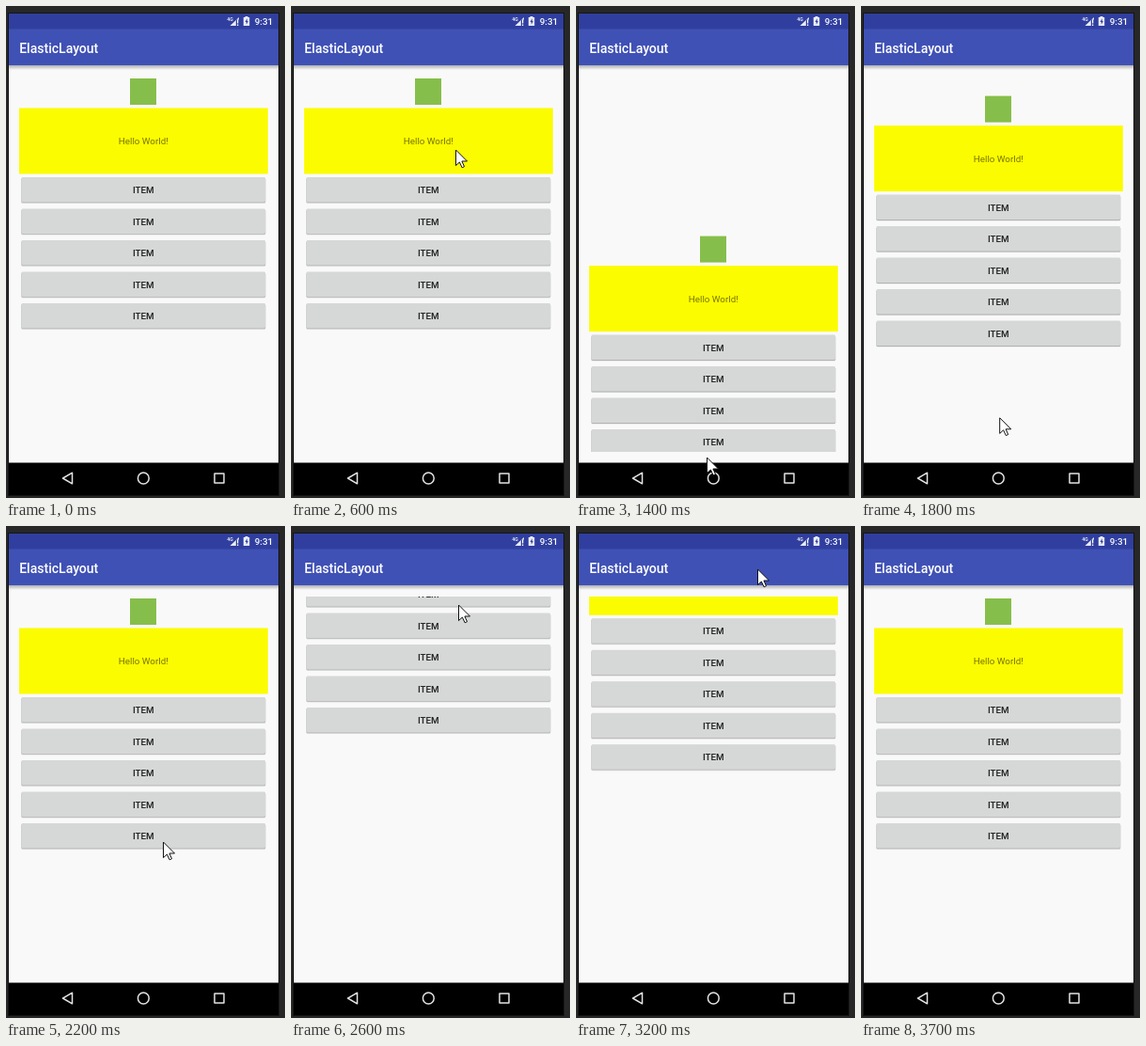
These frames come from a looping animation (297 by 523 pixels, 4 s). An HTML page:

```html
<!DOCTYPE html>
<html lang="en">
<head>
<meta charset="utf-8">
<title>ElasticLayout</title>
<style>
  html, body { margin: 0; width: 100%; height: 100%; overflow: hidden; background: #272727; }
  svg { display: block; width: 297px; height: 523px; font-family: Roboto, sans-serif; }
  .mid { text-anchor: middle; font-size: 9.8px; }
  .bold { font-weight: 500; }
</style>
</head>
<body>
<svg viewBox="0 0 297 523">
  <defs>
    <linearGradient id="shade" x2="0" y2="1">
      <stop offset="0" stop-opacity=".3"/>
      <stop offset="1" stop-opacity="0"/>
    </linearGradient>
    <clipPath id="view"><rect x="3" y="75" width="287" height="399"/></clipPath>
    <g id="button">
      <rect x="16.2" y="183" width="260.2" height="27" rx="1.6" fill-opacity=".1"/>
      <rect x="16.4" y="182.6" width="259.8" height="26.7" rx="1.5" fill-opacity=".2"/>
      <rect x="16.5" y="182" width="259.5" height="26.5" rx="1.4" fill="#d6d7d7"/>
      <text class="mid bold" x="146.3" y="199" fill="#212121">ITEM</text>
    </g>
  </defs>

  <rect width="297" height="523" fill="#272727"/>
  <rect x="2" y="7" width="289" height="514" fill="#151515"/>
  <rect x="3" y="63" width="287" height="423" fill="#f9f9f9"/>
  <rect x="3" y="63" width="287" height="5" fill="url(#shade)"/>

  <g clip-path="url(#view)">
    <g id="list">
      <rect x="132" y="77" width="28" height="28" fill="#86be4b"/>
      <rect x="14" y="108.5" width="264.8" height="70" fill="#fcfc00"/>
      <text class="mid" x="146.3" y="147.2" fill="#757500">Hello World!</text>
    </g>
  </g>

  <rect x="3" y="8" width="287" height="17" fill="#303f9f"/>
  <rect x="3" y="24.5" width="287" height="38.5" fill="#3f51b5"/>
  <text class="bold" x="14.2" y="49.5" font-size="14" fill="#fff">ElasticLayout</text>

  <g fill="#fff">
    <text class="bold" x="235.2" y="15.5" font-size="5.2">4G</text>
    <path d="M248 12V21H238.5Z" fill-opacity=".9"/>
    <path d="M244.8 14.5H248V21H244.8Z" fill="#303f9f"/>
    <path d="M246 14.5h1.3v4H246zM246 19.5h1.3V21H246z"/>
    <path d="M254.5 11h3v1h1.7v9h-6.4v-9h1.7z" fill-opacity=".9"/>
    <path d="M256.7 13.2l-2.2 3.9h1.3v2.7l2.1-3.8h-1.2z" fill="#303f9f"/>
    <text class="bold" x="264.8" y="20" font-size="9.8">9:31</text>
  </g>

  <rect x="3" y="485.5" width="287" height="34.5"/>
  <g fill="none" stroke="#e4e4e4" stroke-width="1.5" stroke-linejoin="round">
    <path d="M60.5 502L70.5 496.2V507.8Z"/>
    <circle cx="146.3" cy="502" r="5.9"/>
    <rect x="222" y="497" width="10" height="10"/>
  </g>

  <path id="cursor" d="M0 0V16.6L3.9 13 6.6 18.8 9 17.7 6.4 12H12Z"
        fill="#fff" stroke="#111" stroke-width="1" stroke-linejoin="round"/>
</svg>
<script>
  const LOOP = 4000, STEP = 100, PITCH = 33.5;
  const list = document.getElementById('list');
  const cursor = document.getElementById('cursor');

  for (let i = 0; i < 5; i++) {
    const item = document.createElementNS('http://www.w3.org/2000/svg', 'use');
    item.setAttribute('href', '#button');
    item.setAttribute('y', i * PITCH);
    list.append(item);
  }

  const progress = (t, from, to) => Math.min(1, Math.max(0, (t - from) / (to - from)));
  const linear = p => p;
  const easeIn = p => 1 - Math.cos(p * Math.PI / 2);
  const easeOut = p => Math.sin(p * Math.PI / 2);

  // Pointer strokes: each runs on from where the last one ended
  const strokes = [
    { from: 100, to: 600, x: 175, y: 153, ease: linear },
    { from: 700, to: 1000, x: 146, y: 347, ease: easeIn },
    { from: 1000, to: 1300, x: 139, y: 480, ease: easeOut },
    { from: 1400, to: 2200, x: 167, y: 336, ease: easeIn },
    { from: 2200, to: 2600, x: 178, y: 84, ease: linear },
    { from: 2600, to: 3000, x: 193, y: 46, ease: easeOut }
  ];

  function pointer(t) {
    let x = 264, y = 78;
    for (const s of strokes) {
      const p = s.ease(progress(t, s.from, s.to));
      x += (s.x - x) * p;
      y += (s.y - y) * p;
    }
    return { x, y };
  }

  // A drag builds up to its peak, then the list decelerates back to rest
  const SETTLE = 650, PULL = 196.7, DAMPING = .488, GRAB_Y = 336;
  const settle = (t, release) => (1 - progress(t, release, release + SETTLE)) ** 2;

  function offset(t, y) {
    if (t < 2200) return PULL * progress(t, 700, 1350) ** 1.67 * settle(t, 1350);
    return DAMPING * (y - GRAB_Y) * settle(t, 3050);
  }

  function draw(now) {
    const t = Math.floor(now % LOOP / STEP) * STEP;
    const { x, y } = pointer(t);
    list.setAttribute('transform', `translate(0 ${offset(t, y).toFixed(2)})`);
    cursor.setAttribute('transform', `translate(${x + .5} ${y})`);
    cursor.setAttribute('visibility', t >= 100 && t < 3700 ? 'visible' : 'hidden');
  }

  const start = performance.now();
  function tick() {
    draw(performance.now() - start);
    requestAnimationFrame(tick);
  }
  tick();
</script>
</body>
</html>
```
